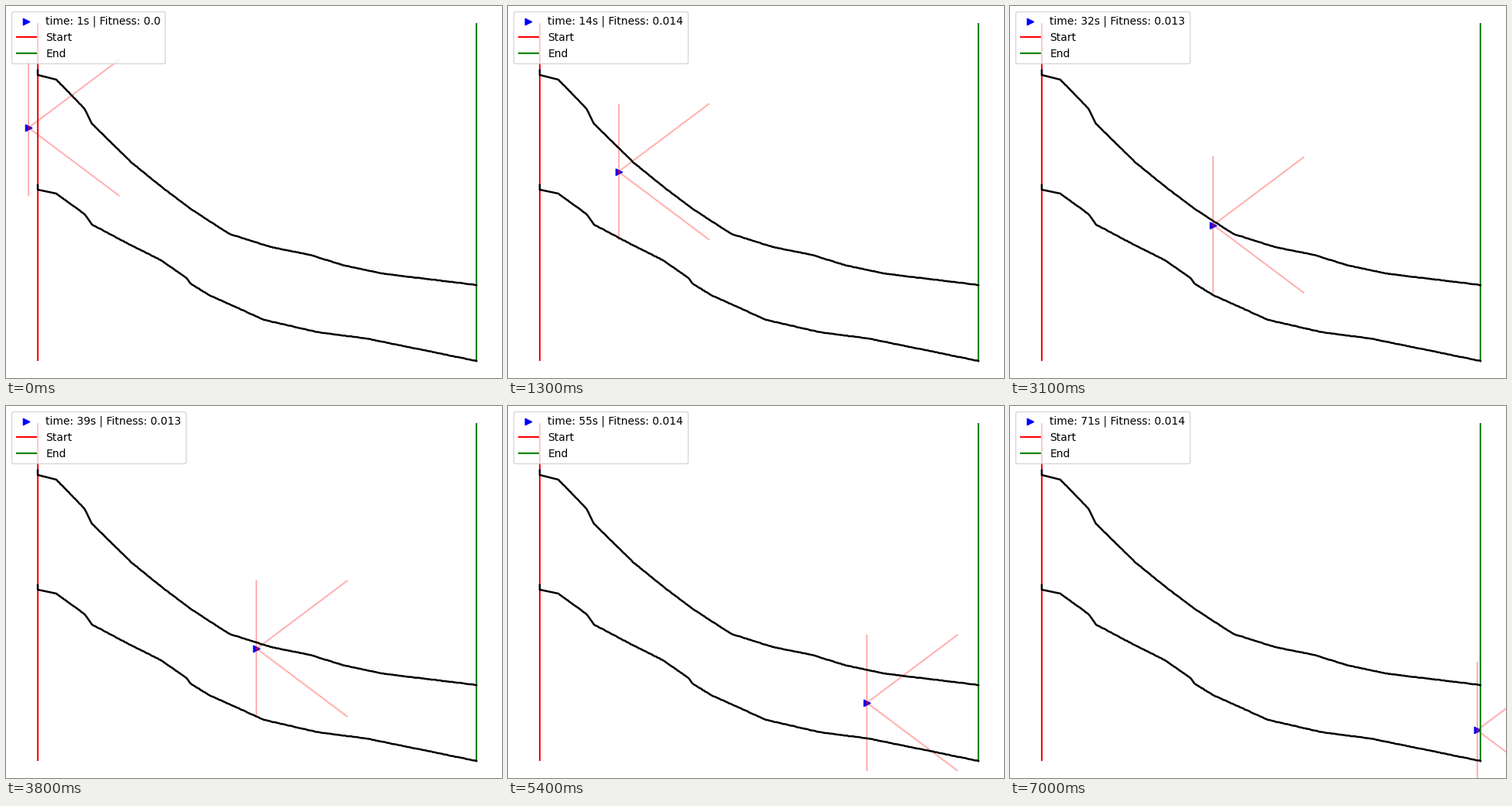
Write a matplotlib script that moves like this. It is 640 by 480 pixels and loops after 7.1 s.

```python
import numpy as np
import matplotlib.pyplot as plt
from matplotlib.animation import FuncAnimation

W, H, DPI = 640, 480, 100
LOW, SPAN = -5, 110
FRAMES, INTERVAL = 71, 100
REACH = 20

# Main bends of each wall in stage pixels, y pointing down
UPPER = [(41, 89), (65, 95), (101, 132), (111, 152), (162, 202), (204, 236),
         (240, 263), (288, 294), (342, 311), (392, 321), (437, 335),
         (488, 345.5), (607, 360)]
LOWER = [(41, 237), (65, 242), (102, 269), (111, 282), (158, 307),
         (199, 327.5), (233, 351), (238, 358), (262, 373), (333, 405),
         (403, 421), (465, 429), (607, 458)]

rng = np.random.default_rng(4)


def draw_wall(bends):
    """Rough line through the bends, with a short stub at its left end."""
    px = np.arange(41, 608, 2)
    py = np.interp(px, *np.transpose(bends))
    rough = px > 65
    py[rough] += rng.uniform(-0.3, 0.3, rough.sum())
    px = np.insert(px, 0, px[0])
    py = np.insert(py, 0, py[0] - 6)
    ax.plot(px * SPAN / W + LOW, (H - py) * SPAN / H + LOW,
            color="black", lw=1.8)


def draw_gate(x, color, label):
    return ax.plot([x, x], [0, 100], color=color, lw=1.5, label=label,
                   solid_capstyle="butt")[0]


def make_path():
    """Steady descent, braking at the upper wall and again near the end."""
    i = np.arange(1, FRAMES)
    gap = abs(i - 28)
    vx = 1.5 - np.maximum(0, 1.6 - 0.4 * gap)
    vy = 1 - np.maximum(0, 0.75 - 0.25 * gap)
    vy *= np.clip(1 - 0.25 * (i - 58.5), 0.25, 1)
    x = np.concatenate([[0], np.cumsum(vx)])
    y = 69 - np.concatenate([[0], np.cumsum(vy)])
    return x, y


path_x, path_y = make_path()

fig = plt.figure(figsize=(W / DPI, H / DPI), dpi=DPI, facecolor="white")
ax = fig.add_axes([0, 0, 1, 1])
ax.set_xlim(LOW, LOW + SPAN)
ax.set_ylim(LOW, LOW + SPAN)
ax.axis("off")

car = ax.scatter([0], [69], marker=">", color="blue", label="time: 1s")
rays = [(0, 1), (1, 1), (1, -1), (0, -1)]
sensors = [ax.plot([], [], color="red", alpha=0.3, lw=1.5)[0] for _ in rays]
start = draw_gate(2, "red", "Start")
end = draw_gate(99.33, "green", "End")
draw_wall(UPPER)
draw_wall(LOWER)

legend = ax.legend(handles=[car, start, end], loc="upper left", fontsize=10)
status = legend.get_texts()[0]


def update(i):
    x, y = path_x[i], path_y[i]
    car.set_offsets([(x, y)])
    for line, (dx, dy) in zip(sensors, rays):
        line.set_data([x, x + REACH * dx], [y, y + REACH * dy])
    seconds = i + 1
    fitness = round(float(x) / seconds / 100, 3)
    status.set_text(f"time: {seconds}s | Fitness: {fitness}")
    return [car, *sensors, legend]


anim = FuncAnimation(fig, update, frames=FRAMES, interval=INTERVAL,
                     repeat=True, repeat_delay=0, blit=False)
plt.show()
```
